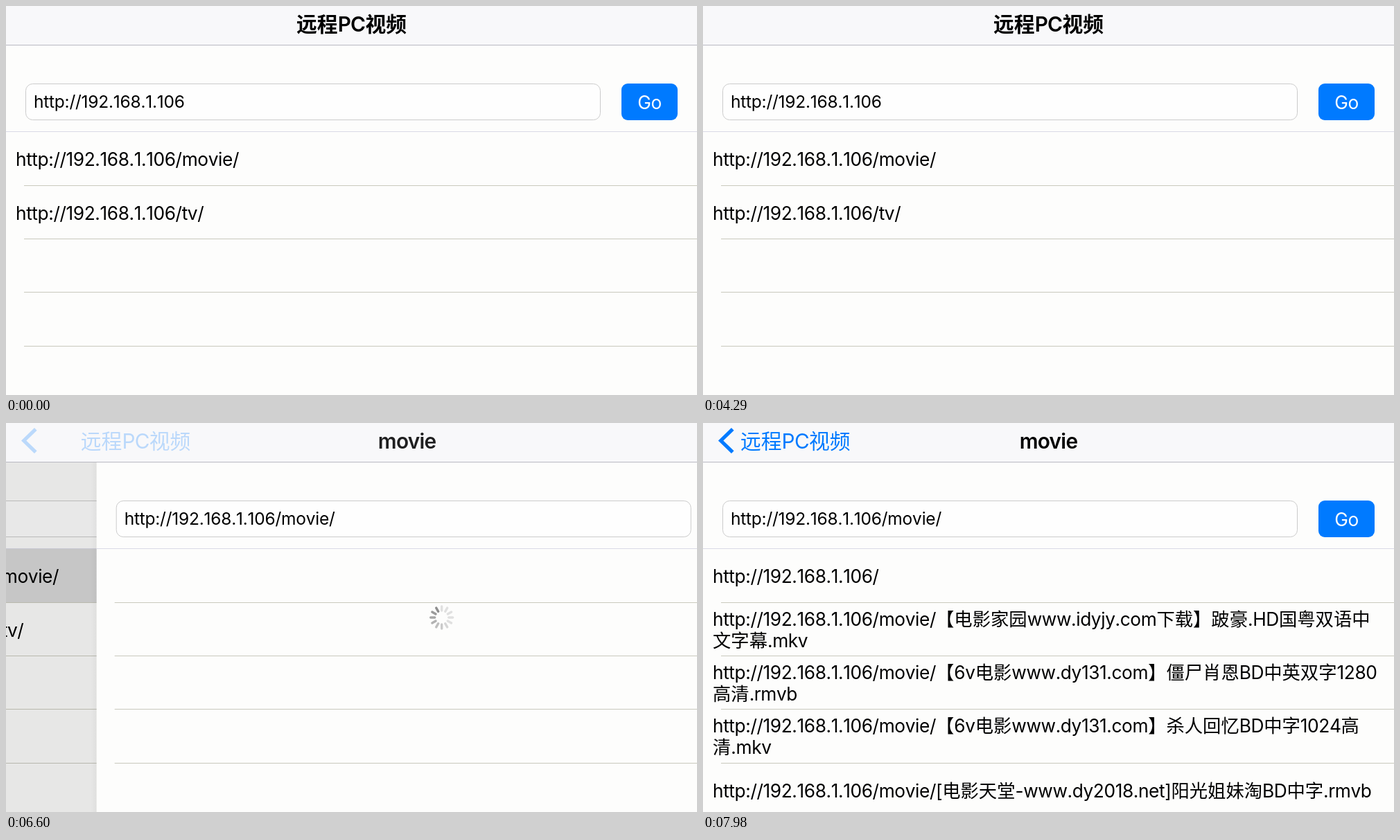
Animation of 997 by 562 pixels, one loop 8000 ms. Source, as an HTML page:

```html
<!DOCTYPE html>
<html lang="zh-CN">
<head>
<meta charset="utf-8">
<title>远程PC视频</title>
<style>
html, body { margin: 0; width: 100%; height: 100%; overflow: hidden; background: #fdfdfc; }
svg { display: block; width: 100vw; height: 100vh; }
text {
  font-family: Inter, "Noto Sans CJK SC", "Noto Sans CJK", sans-serif;
  font-feature-settings: "calt" 0;
  white-space: pre;
}
.row, .url { font-kerning: none; }
.row { font-size: 26.33px; }
.row tspan { letter-spacing: -.42px; }
.url { font-size: 24.57px; letter-spacing: -.26px; }
.go { font-size: 26.33px; letter-spacing: -.42px; fill: #fff; text-anchor: middle; }
.title { font-size: 29.8px; font-weight: 600; }
.title tspan, .back tspan { letter-spacing: -.72px; }
.back { font-size: 29.8px; fill: #007aff; }
.paper { fill: #fdfdfc; }
.field { fill: #fefefe; stroke: #cbcbcb; }
.rule { stroke: #c9c9bd; }
.edge { stroke: #dadae6; }
</style>
</head>
<body>
<svg viewBox="0 0 997 562" preserveAspectRatio="none">
  <defs>
    <linearGradient id="shade">
      <stop offset="0" stop-opacity="0"/>
      <stop offset="1" stop-opacity=".25"/>
    </linearGradient>
  </defs>
  <g id="home"></g>
  <rect id="dim" width="997" height="562"/>
  <g id="movie">
    <rect id="shadow" x="-9" y="57" width="9" height="505" fill="url(#shade)"/>
    <g id="page"></g>
    <g id="list"></g>
    <g id="spinner" transform="translate(498 281)"></g>
  </g>
  <rect width="997" height="56" fill="#f8f8fa"/>
  <path d="M0 56.5H997" stroke="#b9b9c1"/>
  <path id="chevron" d="M42.8 8.8L25.7 25.5L42.8 42.2" fill="none" stroke="#007aff" stroke-width="5.2"/>
  <g id="oldTitle"></g>
  <g id="backLabel"></g>
  <g id="newTitle"></g>
</svg>
<script>
const LOOP = 8000, W = 997;
const PUSH = 6320;          // reference tick of the push transition
const PRESS_TICK = -6, LOAD_TICK = 12, NAV_END_TICK = 18, END_TICK = 25;
const HOST = 'http://192.168.1.106';

const $ = id => document.getElementById(id);
const shift = (el, x) => el.setAttribute('transform', `translate(${x.toFixed(2)} 0)`);
const fade = (el, a) => el.setAttribute('opacity', Math.max(0, Math.min(1, a)).toFixed(3));
const show = (el, on) => el.setAttribute('visibility', on ? 'visible' : 'hidden');

// Latin runs get their own tracking, Chinese keeps its full width
const label = (cls, x, y, s, extra = '') =>
  `<text class="${cls}" x="${x}" y="${y}" ${extra}>${s.replace(/[ -~]+/g, '<tspan>$&</tspan>')}</text>`;
const row = (y, s) => label('row', 14, y, s);

function page(url) {
  const rules = [259.5, 336.5, 413.5, 491.5].map(y => `M26 ${y}H${W}`).join('');
  return `<rect class="paper" width="${W}" height="562"/>
    <rect class="field" x="28.5" y="112.5" width="829" height="52" rx="10"/>
    <text class="url" x="40" y="147.3">${url}</text>
    <rect x="888" y="112" width="81" height="53" rx="9" fill="#007aff"/>
    <text class="go" x="928.5" y="148.7">Go</text>
    <path class="edge" d="M0 181.5H${W}"/>
    <rect class="press" y="182" width="${W}" height="78" fill="#d9d9d9" visibility="hidden"/>
    <path class="rule" d="${rules}"/>`;
}

$('home').innerHTML = page(HOST) + row(231.3, HOST + '/movie/') + row(308.6, HOST + '/tv/');
$('page').innerHTML = page(HOST + '/movie/');
$('list').innerHTML = [
  [231.3, HOST + '/'],
  [292.6, HOST + '/movie/【电影家园www.idyjy.com下载】跛豪.HD国粤双语中'],
  [323.6, '文字幕.mkv'],
  [369.9, HOST + '/movie/【6v电影www.dy131.com】僵尸肖恩BD中英双字1280'],
  [400.9, '高清.rmvb'],
  [447.2, HOST + '/movie/【6v电影www.dy131.com】杀人回忆BD中字1024高'],
  [478.2, '清.mkv'],
  [540.6, HOST + '/movie/[电影天堂-www.dy2018.net]阳光姐妹淘BD中字.rmvb']
].map(r => row(...r)).join('');

const middle = 'text-anchor="middle"';
$('oldTitle').innerHTML = label('title', 498.5, 37.3, '远程PC视频', middle);
$('newTitle').innerHTML = label('title', 498.5, 37.3, 'movie', middle);
$('backLabel').innerHTML = label('back', 54, 37.3, '远程PC视频');

const spokes = Array.from({ length: 12 }, (_, i) => {
  const line = document.createElementNS('http://www.w3.org/2000/svg', 'path');
  line.setAttribute('d', 'M0 -10V-16');
  line.setAttribute('transform', `rotate(${i * 30})`);
  line.setAttribute('stroke', '#8e8e8e');
  line.setAttribute('stroke-width', 3.4);
  line.setAttribute('stroke-linecap', 'round');
  return $('spinner').appendChild(line);
});
const press = $('home').querySelector('.press');

// Ticks come in threes: one held 100 ms, then two of 20 ms
function tickAt(t) {
  const group = Math.floor((t - PUSH) / 140), m = t - PUSH - group * 140;
  return group * 3 + (m < 100 ? 0 : m < 120 ? 1 : 2);
}

// Critically damped spring: share of the way still to go
function remaining(n, end) {
  if (n >= end) return 0;
  const w = Math.max(0, 1.719 + .3045 * n);
  return (1 + w) * Math.exp(-w);
}

function draw(t) {
  const n = tickAt(t);
  const r = remaining(n, END_TICK), p = 1 - r;
  const nav = remaining(n, NAV_END_TICK);
  const loaded = n >= LOAD_TICK;
  const backAlpha = (Math.max(0, n + 5.65) / 23.65) ** 2;

  show(press, n >= PRESS_TICK);
  shift($('home'), -.3 * W * p);
  fade($('dim'), .1 * p);
  shift($('movie'), W * r);
  show($('movie'), p > 0);
  fade($('shadow'), r);
  fade($('list'), loaded ? 1 : 0);
  fade($('spinner'), loaded ? 0 : 1);

  const head = 10 + Math.floor(n / 6);
  spokes.forEach((s, i) => {
    const age = (((head - i) % 12) + 12) % 12;
    fade(s, Math.max(.25, 1 - age * .11));
  });

  shift($('oldTitle'), -318 * (1 - nav));
  fade($('oldTitle'), (nav - .22) / .78);
  shift($('newTitle'), 611.5 * nav);
  fade($('newTitle'), 1 - nav);
  shift($('backLabel'), 410.5 * nav);
  fade($('backLabel'), backAlpha);
  fade($('chevron'), backAlpha);
}

let start;
function loop(now) {
  start ??= now;
  draw((now - start) % LOOP);
  requestAnimationFrame(loop);
}
draw(0);
requestAnimationFrame(loop);
</script>
</body>
</html>
```
